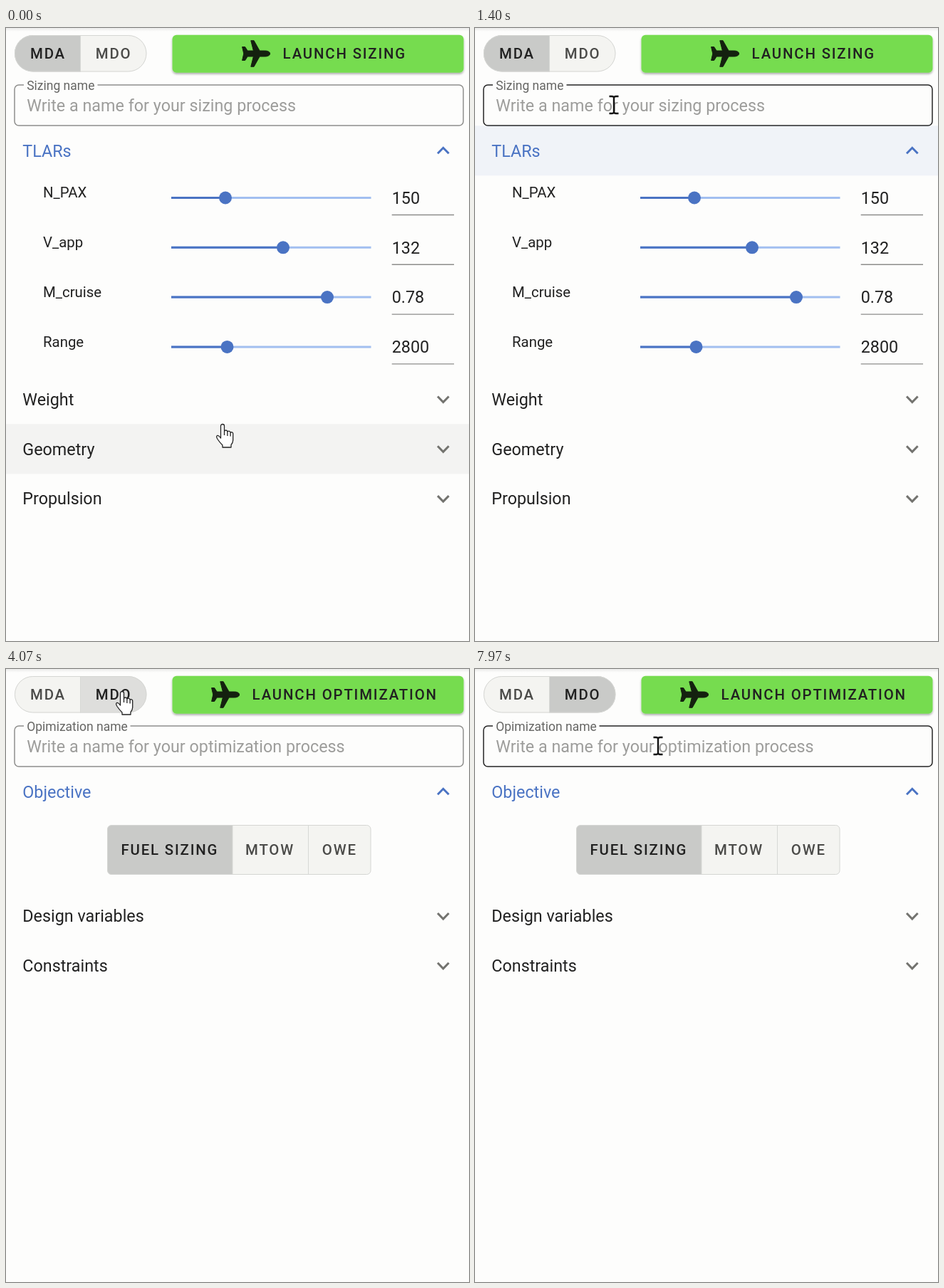
Write an HTML page that moves like this. It is 650 px wide and 861 px high and loops after 8 s.

```html
<!DOCTYPE html>
<html lang="en">
<head>
<meta charset="utf-8">
<title>Sizing panel</title>
<style>
  html, body { margin: 0; width: 100%; height: 100%; overflow: hidden; background: #fdfdfc; }
  svg { display: block; width: 100%; height: 100%; font-family: Roboto, sans-serif; font-size: 23.33px; fill: #212121; }
  .btn { font-size: 20.4px; font-weight: 500; letter-spacing: 1.82px; }
  .label { font-size: 20.4px; }
  .hint { fill: #9d9d9b; }
  .legend { font-size: 17.5px; fill: #666664; }
  .dim { fill: #4b4b49; }
  .blue { fill: #4a73c3; }
  .line { fill: none; stroke-width: 3; }
  .cursor { fill: #fff; stroke: #222; stroke-width: 1.3; stroke-linejoin: round; }
</style>
</head>
<body>
<svg id="stage" viewBox="0 0 650 861" xmlns="http://www.w3.org/2000/svg">
  <defs>
    <linearGradient id="bar" x2="0" y2="1">
      <stop stop-color="#ebebea"/><stop offset="1" stop-color="#fdfdfc"/>
    </linearGradient>
    <filter id="shadow" x="-5%" y="-20%" width="110%" height="150%">
      <feDropShadow dx="0" dy="2" stdDeviation="1.7" flood-opacity=".32"/>
    </filter>
    <clipPath id="pill"><rect x="12" y="10" width="185.500" height="51.500" rx="25.700"/></clipPath>
    <path id="plane" d="M20 0C20-2.600 16.500-4 13-4H5.500L-2.500-18.300H-6.800L-3.200-4H-11.500L-15-9.500H-19L-16.800 0L-19 9.500H-15L-11.500 4H-3.200L-6.800 18.300H-2.500L5.500 4H13C16.500 4 20 2.600 20 0Z" fill="#14210f" stroke="#14210f" stroke-linejoin="round"/>
  </defs>
  <rect width="650" height="861" fill="#fdfdfc"/>
  <rect width="650" height="5" fill="url(#bar)"/>

  <g clip-path="url(#pill)">
    <rect x="12" y="10" width="186" height="52" fill="#f4f4f1"/>
    <rect id="mdaFill" x="12" y="10" width="92.500" height="52" fill="#c9cac8"/>
    <rect id="mdoFill" x="104.500" y="10" width="93" height="52" fill="#c9cac8"/>
    <path d="M104.500 10V62" stroke="#d7d8d5"/>
  </g>
  <rect x="12.500" y="10.500" width="184.500" height="50.500" rx="25.200" fill="none" stroke="#d5d6d3"/>
  <text id="mdaText" class="btn" x="34" y="43.200">MDA</text>
  <text id="mdoText" class="btn" x="125.800" y="43.200">MDO</text>

  <rect x="233.500" y="9.800" width="409" height="53" rx="5.800" fill="#76dc50" filter="url(#shadow)"/>
  <path id="outline" fill="none" stroke-width="1.5"/>

  <g id="mda"></g>
  <g id="mdo"></g>

  <path id="hand" class="cursor" d="M-2.500 20V3a2.500 2.500 0 0 1 5 0V11a2.200 2.200 0 0 1 4.400 .5a2.200 2.200 0 0 1 4.200 1a2 2 0 0 1 3.600 1.500V23Q14.500 27 12 29.500V33H0V30Q-4 26-7 21.500Q-9.500 17.500-7.500 16.500Q-5.500 16-2.500 20ZM2.500 11V16M6.900 11.500V17M11.100 12.500V17.500"/>
  <path id="arrow" class="cursor" d="M0 0V23L5.200 18.200L9 26.500L12.700 25L8.900 17H16.800Z"/>
  <path id="beam" fill="none" stroke="#111" stroke-width="2.400" d="M-6.500-12H-3Q0-12 0-9.500Q0-12 3-12H6.500M0-9.500V9.500M-6.500 12H-3Q0 12 0 9.500Q0 12 3 12H6.500"/>
</svg>
<script>
const $ = id => document.getElementById(id);
const LOOP = 8000, CLICK = 3740, LEAVE = 5190, STEP = 69.8, FADE = 300;

const text = (x, y, s, cls = '') => `<text x="${x}" y="${y}" class="${cls}">${s}</text>`;

function header(y, title, open, id = '') {
  const d = open ? -1 : 1, color = open ? '#4a73c3' : '#73736f';
  return `<rect id="${id}" y="${y - 35}" width="650" height="70" fill="${open ? color : '#000'}" opacity="0"/>`
    + text(23.3, y + 8.3, title, open ? 'blue' : '')
    + `<path class="line" stroke="${color}" d="M606 ${y - 4 * d}L613.800 ${y + 4 * d}L621.600 ${y - 4 * d}"/>`;
}

function slider([name, value, x], i) {
  const y = 238.5 + STEP * i;
  return text(52, y - 0.4, name, 'label')
    + `<path class="line" stroke="#a2bff0" d="M232 ${y}H512.500"/>`
    + `<path class="line" stroke="#4a73c3" d="M232 ${y}H${x}"/>`
    + `<circle class="blue" cx="${x}" cy="${y}" r="9"/>`
    + text(541.7, y + 8.3, value)
    + `<path stroke="#8d8d8b" stroke-width="1.4" d="M541.700 ${y + 24}H629"/>`;
}

const banner = (legend, hint, planeX, action) =>
  text(29.2, 87.3, legend, 'legend') + text(29.2, 116.7, hint, 'hint')
  + `<use href="#plane" x="${planeX}" y="36"/>` + text(planeX + 38, 43.2, action, 'btn');

$('mda').innerHTML = banner('Sizing name', 'Write a name for your sizing process', 350.6, 'LAUNCH SIZING')
  + header(172.3, 'TLARs', true, 'tlars')
  + [['N_PAX', '150', 308], ['V_app', '132', 389], ['M_cruise', '0.78', 451], ['Range', '2800', 310.5]].map(slider).join('')
  + ['Weight', 'Geometry', 'Propulsion'].map((s, i) => header(521.5 + STEP * i, s, false, s.toLowerCase())).join('');

$('mdo').innerHTML = banner('Opimization name', 'Write a name for your optimization process', 307.6, 'LAUNCH OPTIMIZATION')
  + header(172.3, 'Objective', true)
  + `<rect x="142.500" y="219.500" width="369.500" height="69" rx="5.500" fill="#f4f4f1"/>
     <path d="M318 219.500H148a5.500 5.500 0 0 0-5.500 5.500V283a5.500 5.500 0 0 0 5.500 5.500H318Z" fill="#c9cac8"/>
     <path d="M318 219.500V288.500M424.500 219.500V288.500" stroke="#d7d8d5"/>
     <rect x="142.500" y="219.500" width="369.500" height="69" rx="5.500" fill="none" stroke="#d5d6d3"/>`
  + text(161.6, 261.4, 'FUEL SIZING', 'btn') + text(336, 261.4, 'MTOW', 'btn dim') + text(443.8, 261.4, 'OWE', 'btn dim')
  + header(347, 'Design variables') + header(416.8, 'Constraints');

// Pointer stops: time, x, y
const stops = [
  [0, 304, 556], [430, 273, 386], [1170, 213, 157], [1730, 172, 59], [2080, 163, 31],
  [5000, 163, 31], [5470, 238, 80], [5900, 257, 108], [8000, 257, 108]
];

// Speed at a stop; zero where the pointer rests
function slope(i, k) {
  if (i >= 4 && i !== 6) return 0;
  const a = stops[Math.max(i - 1, 0)], b = stops[i + 1];
  return (b[k] - a[k]) / (b[0] - a[0]);
}

function pointer(t) {
  let i = 0;
  while (t >= stops[i + 1][0]) i++;
  const a = stops[i], b = stops[i + 1], span = b[0] - a[0], u = (t - a[0]) / span, v = 1 - u;
  return [1, 2].map(k => a[k] * (1 + 2 * u) * v * v + b[k] * u * u * (3 - 2 * u)
    + span * u * v * (slope(i, k) * v - slope(i + 1, k) * u));
}

const ramp = (t, from, time) => {
  const u = Math.min(1, Math.max(0, (t - from) / time));
  return u * u * (3 - 2 * u);
};
const hover = (t, from, to) => ramp(Math.min(t, to), from, FADE) * (1 - ramp(t, to, FADE));

function cursorAt(x, y, sizing) {
  if (y > 80.5 && y < 137) return 'beam';
  if (y < 61 && x < 197) return 'hand';
  if (y >= 137 && y < 207) return 'hand';
  return sizing && y > 486 ? 'hand' : 'arrow';
}

function draw(t) {
  const sizing = t < CLICK, [x, y] = pointer(t), kind = cursorAt(x, y, sizing);
  $('mda').style.display = sizing ? '' : 'none';
  $('mdo').style.display = sizing ? 'none' : '';

  $('geometry').setAttribute('opacity', 0.04 * hover(t, -500, 15));
  $('weight').setAttribute('opacity', 0.04 * hover(t, 15, 175));
  $('tlars').setAttribute('opacity', 0.12 * hover(t, 960, 1270));

  const swap = ramp(t, CLICK, 200);
  $('mdaFill').setAttribute('opacity', 1 - swap);
  $('mdoFill').setAttribute('opacity', 0.08 * ramp(t, 1710, 200) + 0.42 * swap + 0.5 * ramp(t, LEAVE, 200));
  $('mdaText').classList.toggle('dim', !sizing);
  $('mdoText').classList.toggle('dim', sizing);

  const gap = sizing ? 128.5 : 174.5;
  $('outline').setAttribute('d', `M25 80H18a6 6 0 0 0-6 6V131a6 6 0 0 0 6 6H636a6 6 0 0 0 6-6V86a6 6 0 0 0-6-6H${gap}`);
  $('outline').setAttribute('stroke', kind === 'beam' ? '#242424' : '#8f8f8d');

  for (const id of ['hand', 'arrow', 'beam']) {
    $(id).style.display = id === kind ? '' : 'none';
    $(id).setAttribute('transform', `translate(${Math.round(x)} ${Math.round(y)})`);
  }
}

function tick() {
  draw(performance.now() % LOOP);
  requestAnimationFrame(tick);
}
tick();
</script>
</body>
</html>
```
